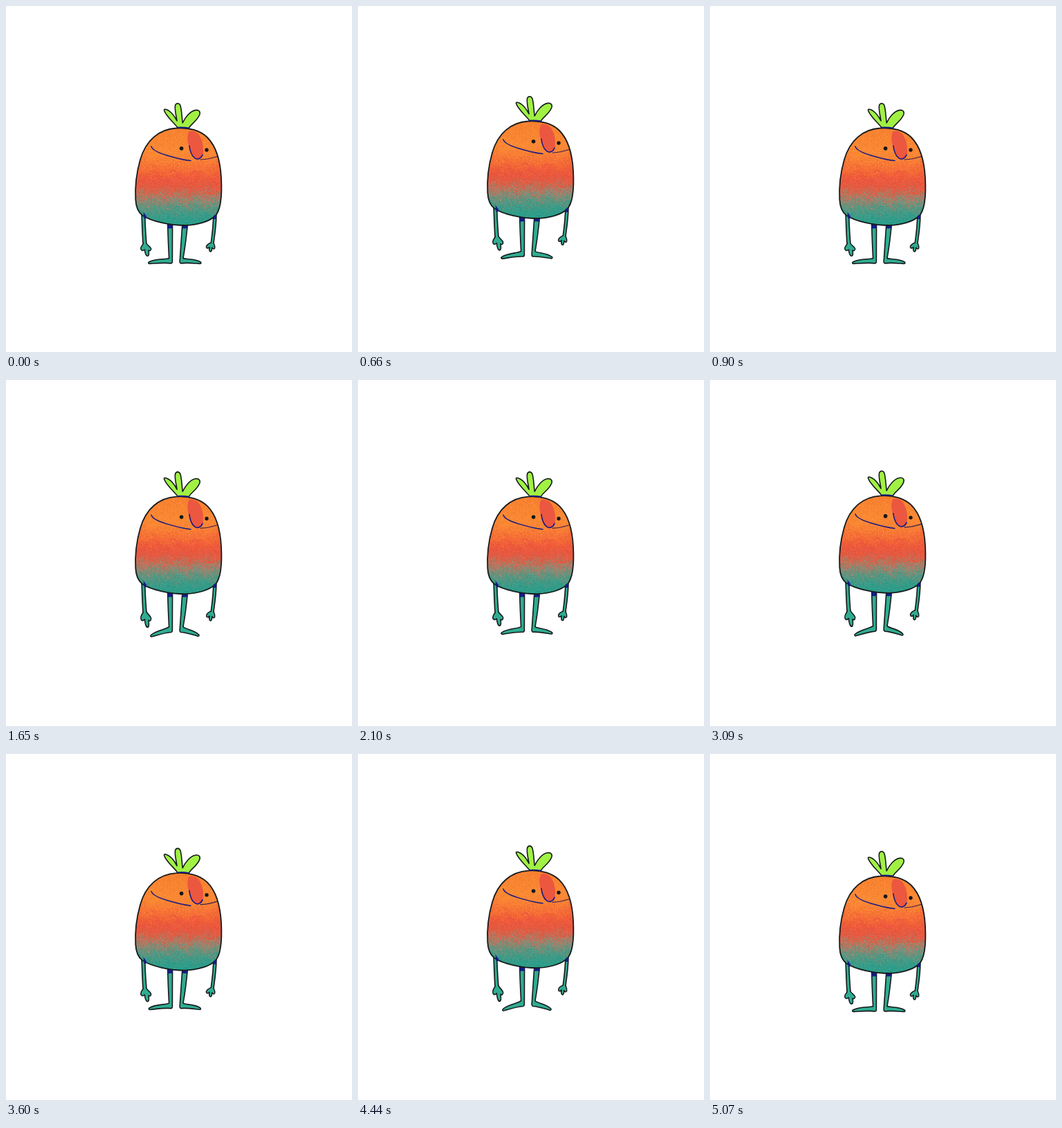
An HTML page with a canvas that plays this animation: 500 px wide and 500 px high, repeating every 5.43 s.

```html
<!DOCTYPE html>
<html lang="en">
<head>
<meta charset="utf-8">
<title>Hopping fruit</title>
<style>
html, body { margin: 0; width: 100%; height: 100%; overflow: hidden; background: #fff; }
canvas { display: block; width: 500px; height: 500px; }
</style>
</head>
<body>
<canvas id="stage" width="500" height="500"></canvas>
<script>
const ctx = document.getElementById('stage').getContext('2d');
const LOOP = 5430, STEP = 30, RISE = 540, HOP = 900, HEIGHT = 15.6;
const STARTS = [0, 1380, 2790, 4170];
const INK = '#161a1c', NAVY = '#171a86', TEAL = '#2fac91';

// droop of feet and hands in degrees: [ms into the hop, angle]
const DROOP = [[0, 0], [270, 12], [330, 12.5], [540, 8], [660, 5], [720, 5], [900, 0]];

const body = new Path2D('M246 176.5C221 178 202 194 194 222C188.5 241 186.3 262 187.3 280' +
  'C188 292 191 298 197 302.5C210 311.5 238 317 259 317C276 316.5 294 311.5 302 303.5' +
  'C311 295 312.3 272 311 248C309.5 222 304 203 291 190C281 180 264 175 246 176.5Z');
const leaves = new Path2D('M247.5 175C241 167 231 159 228.5 150.8C228 147.5 234 150 238 153.5' +
  'C242 157 245 162 247 166C246 158 243.5 150 244.5 144C245.5 139.6 250.5 139.6 252 144' +
  'C254 151 254 160 255.2 169C259 161 266 152 273.5 150.6C279 149.5 281.5 153 279.5 157.5C276 166 268 170 264.5 176');
const nose = new Path2D('M264 182C267 179 275 180.5 279.5 187C284.5 195 286.5 208 284 216C282 222 275 222.5 270.5 217.5C264.5 210 259.5 190 264 182Z');
const noseEdge = new Path2D('M264.8 202C266 210 269 217 272.5 219.6C277 222.8 282 220.3 284 215');
const mouth = new Path2D('M210 202.8C211 207 220 212 232 215.7C243 219 255 222.3 267 223.6');
const cheek = new Path2D('M281 222C289 221.6 298 220 305.5 217.3');

// open ends let arm and hand join without a seam
const leftArm = new Path2D('M196 300C196.8 317 197 332 198.2 346L203 345C202.4 332 200.8 318 201 304');
const rightArm = new Path2D('M299.7 303C299.6 317 297.8 331 296 344L299.8 344C301.6 331 303.8 318 304 301');
const leftHand = new Path2D('M198.2 344C195.5 347 194 350 195.3 352.4C196.5 354 198.5 353.5 200.5 352' +
  'C200.3 355 202 361 204.5 361.3C207 361.3 206.8 357 206 353C208 354.5 210.2 353 209.6 350.5C208.5 347.5 205 346.5 203 343');
const rightHand = new Path2D('M296.2 342C292 343.5 288.7 346.5 289.6 348.9C290.5 351 293 349.8 294.2 348.5' +
  'C293.2 352 293.7 355 295.7 355C298 354.5 297.3 351.5 297.8 349C298.8 351 300.4 352 301.7 349.8C302.4 346.8 300.8 344.5 299.8 342');
const socketLeft = new Path2D('M198.5 297.5L203.3 304.5L202 307.5L199.5 307Z');
const socketRight = new Path2D('M299.5 303.5L304 301.5L303.6 308L300 308Z');

let seed = 77;
const rand = () => (seed = (seed * 16807) % 2147483647) / 2147483647;
const mix = (a, b, k) => a + (b - a) * k;

const SHADES = [
  [176, [247, 128, 48]], [215, [251, 139, 52]], [234, [246, 114, 54]],
  [250, [238, 84, 60]], [265, [224, 93, 68]], [279, [156, 134, 112]],
  [294, [78, 153, 132]], [309, [44, 156, 137]], [322, [40, 160, 140]]
];
function shade(y) {
  let i = 0;
  while (i < SHADES.length - 2 && y > SHADES[i + 1][0]) i++;
  const [y0, a] = SHADES[i], [y1, b] = SHADES[i + 1];
  const k = Math.min(1, Math.max(0, (y - y0) / (y1 - y0)));
  return a.map((v, n) => mix(v, b[n], k));
}

// grainy skin, painted once
function paintSkin() {
  const c = document.createElement('canvas');
  c.width = 130;
  c.height = 148;
  const g = c.getContext('2d');
  for (let y = 0; y < c.height; y++) {
    for (let x = 0; x < c.width; x++) {
      const side = Math.abs(x - 65) / 62;
      const drift = 2 * Math.sin(x * 0.21 + 2 * Math.sin(y * 0.13));
      const spread = (rand() + rand() - 1) * 15;
      const light = (rand() - 0.5) * 16;
      const lift = y < 60 ? 8 * side ** 4 : 0;
      const rgb = shade(174 + y + drift + spread + lift).map(v => Math.round(v + light));
      g.fillStyle = `rgb(${rgb})`;
      g.fillRect(x, y, 1, 1);
    }
  }
  return c;
}
const skin = paintSkin();

function line(path, color, width) {
  ctx.strokeStyle = color;
  ctx.lineWidth = width;
  ctx.stroke(path);
}
function shape(path, fill, width = 1.6) {
  ctx.fillStyle = fill;
  ctx.fill(path);
  if (width) line(path, INK, width);
}
function dot(x, y, r) {
  ctx.fillStyle = '#17171b';
  ctx.beginPath();
  ctx.arc(x, y, r, 0, Math.PI * 2);
  ctx.fill();
}

// dir is -1 for a foot pointing left, 1 for right
function leg(hipIn, hipOut, heel, dir, size, droop) {
  const y0 = 371, a = droop * Math.PI / 180, fit = size / 34 * (1 - droop * 0.006);
  const at = (u, v) => {
    u *= fit;
    return [heel + dir * (u * Math.cos(a) - v * Math.sin(a)), y0 + u * Math.sin(a) + v * Math.cos(a)];
  };
  const p = new Path2D();
  p.moveTo(hipOut, 313);
  p.quadraticCurveTo(mix(hipOut, heel + dir * 5, 0.4), 342, heel + dir * 4.8, y0 - 6.5);
  p.bezierCurveTo(...at(9, -4.4), ...at(24, -6.6), ...at(33.5, -1));
  p.bezierCurveTo(...at(35, 0.4), ...at(34, 1.4), ...at(32, 1.4));
  p.bezierCurveTo(...at(22, 0.8), ...at(10, -0.4), ...at(2, 0.9));
  p.quadraticCurveTo(heel - dir * 0.4, y0 + 0.8, heel, y0 - 3);
  p.lineTo(hipIn, 313);
  p.closePath();
  shape(p, TEAL);
  ctx.fillStyle = NAVY;
  ctx.fillRect(Math.min(hipIn, hipOut), 313, Math.abs(hipIn - hipOut), 8.4);
}

function hand(path, x, y, stretch) {
  ctx.save();
  ctx.translate(x, y);
  ctx.scale(1, stretch);
  ctx.translate(-x, -y);
  shape(path, TEAL, 1.5);
  ctx.restore();
}

function lift(t) {
  if (t <= 0 || t >= HOP) return 0;
  if (t < RISE) return HEIGHT * (1 - Math.cos(Math.PI * t / RISE)) / 2;
  const k = (t - RISE) / (HOP - RISE);
  return HEIGHT * (1 - k - 0.03 * Math.sin(2 * Math.PI * k));
}

function droopAt(t) {
  for (let i = 1; i < DROOP.length; i++) {
    const [t0, a] = DROOP[i - 1], [t1, b] = DROOP[i];
    if (t <= t1) return mix(a, b, (t - t0) / (t1 - t0));
  }
  return 0;
}

function draw(t) {
  const droop = droopAt(t);
  ctx.fillStyle = '#fff';
  ctx.fillRect(0, 0, 500, 500);
  ctx.save();
  ctx.translate(0, -lift(t));
  ctx.lineCap = ctx.lineJoin = 'round';

  leg(240.6, 233.6, 240.4, -1, 34.5, droop);
  leg(255, 262.6, 251.2, 1, 30.5, droop);
  shape(leftArm, TEAL);
  shape(rightArm, TEAL);
  hand(leftHand, 201, 345, 1 + droop * 0.02);
  hand(rightHand, 297, 342, 1 + droop * 0.005);
  shape(leaves, '#a0f143');

  ctx.save();
  ctx.clip(body);
  ctx.drawImage(skin, 184, 174);
  ctx.restore();
  line(body, INK, 1.8);
  line(new Path2D('M247.5 175.6Q256 174.8 264.5 176.4'), NAVY, 1.7);
  shape(socketLeft, NAVY, 0);
  shape(socketRight, NAVY, 0);

  line(mouth, NAVY, 1.5);
  line(cheek, '#35214f', 1.2);
  shape(nose, '#ec573f', 0);
  line(noseEdge, NAVY, 1.6);
  dot(253.6, 205.8, 2.8);
  dot(290, 208, 2.7);
  ctx.restore();
}

const begin = performance.now();
function tick() {
  const now = Math.floor(((performance.now() - begin) % LOOP) / STEP) * STEP;
  const start = STARTS.filter(s => s <= now).pop();
  draw(now - start);
  requestAnimationFrame(tick);
}
tick();
</script>
</body>
</html>
```
